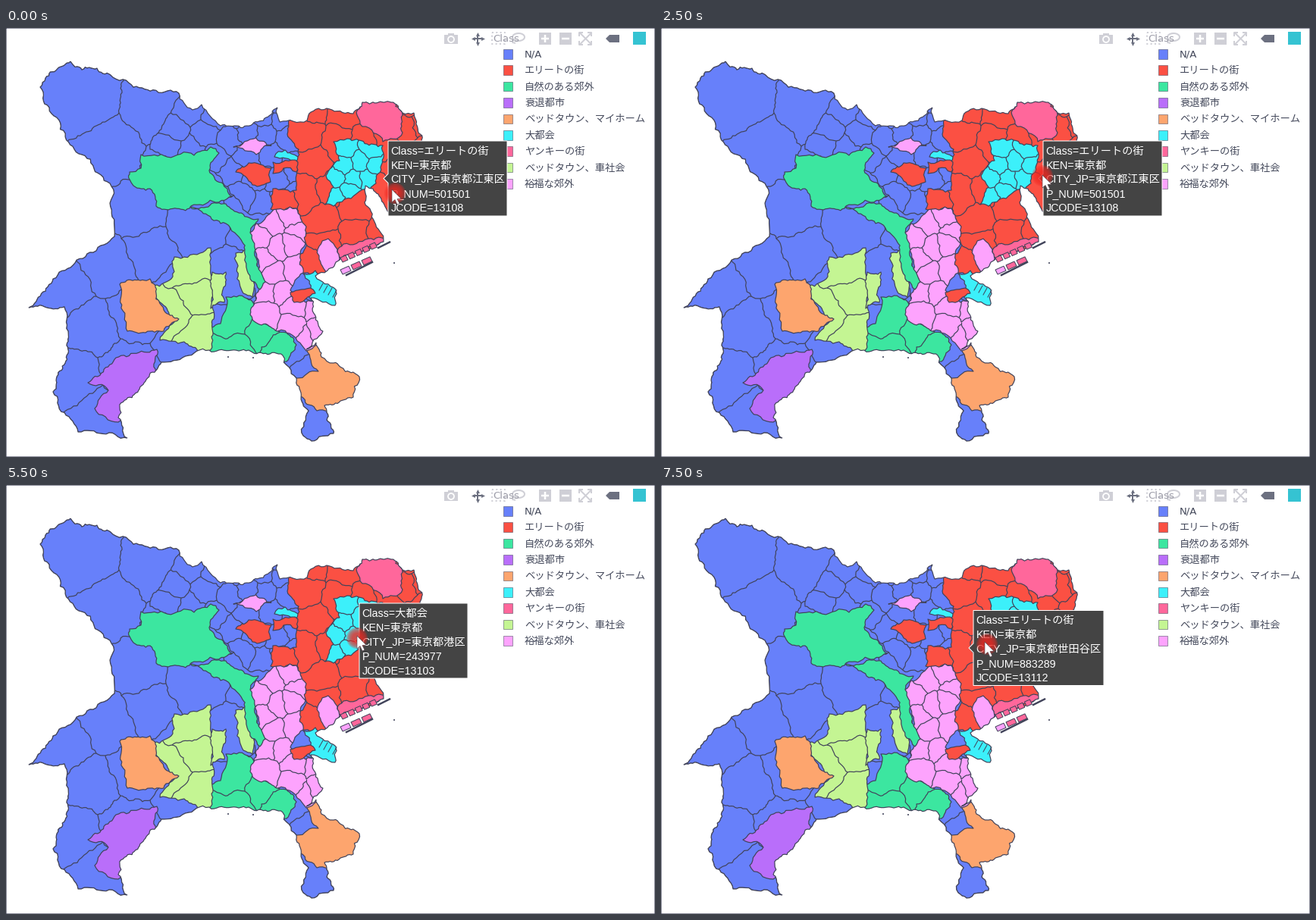
These frames come from a looping animation (856 by 566 pixels, 8 s). A matplotlib script:

```python
import math
import random

import matplotlib.pyplot as plt
import numpy as np
from matplotlib.animation import FuncAnimation
from matplotlib.collections import LineCollection
from matplotlib.patches import Circle, PathPatch, Polygon, Rectangle
from matplotlib.path import Path

W, H, DPI = 856, 566, 100
PX = 72 / DPI
plt.rcParams["toolbar"] = "None"

BLUE, RED, GREEN, PURPLE = "#6780fa", "#fb5043", "#3ce6a0", "#b96efa"
ORANGE, CYAN, PINK = "#fda56e", "#3cf0fa", "#ff679b"
LIME, LILAC = "#c4f593", "#fda3fd"
EDGE = "#41435a"
HOVER_FONT = ["Liberation Sans", "Noto Sans CJK JP"]
LEGEND_FONT = ["DejaVu Sans", "Noto Sans CJK JP"]

fig = plt.figure(figsize=(W / DPI, H / DPI), dpi=DPI, facecolor="white")
ax = fig.add_axes([0, 0, 1, 1])
ax.set_xlim(0, W)
ax.set_ylim(H, 0)
ax.axis("off")


def split(a, b, rng):
    """Midpoint displacement between a and b, without b itself."""
    d = math.dist(a, b)
    if d < 5:
        return [a]
    k = rng.uniform(-0.2, 0.2) * min(1, 16 / d)
    m = ((a[0] + b[0]) / 2 - (b[1] - a[1]) * k,
         (a[1] + b[1]) / 2 + (b[0] - a[0]) * k)
    return split(a, m, rng) + split(m, b, rng)


def rough(pts):
    """Natural-looking line; an edge shared by two shapes gets one course."""
    out = []
    for a, b in zip(pts, pts[1:]):
        lo, hi = sorted((a, b))
        rng = random.Random(lo[0] * 7919 + lo[1] * 104729 + hi[0] * 31 + hi[1])
        part = split(lo, hi, rng) + [hi]
        out += (part if lo == a else part[::-1])[:-1]
    return out + [pts[-1]]


def ring(flat):
    pts = list(zip(flat[::2], flat[1::2]))
    return rough(pts + pts[:1])


def spread(path, n, rng):
    """n evenly spread centres inside a path (k-means on random points)."""
    box = path.get_extents()
    pts = rng.uniform(box.min, box.max, (160 * n, 2))
    pts = pts[path.contains_points(pts)]
    centres = pts[:n]
    for _ in range(6):
        near = np.linalg.norm(pts[:, None] - centres, axis=2).argmin(1)
        centres = np.array([pts[near == i].mean(0) for i in range(n)])
    return centres


def cell(i, centres):
    """Voronoi cell i: a big square cut by every bisector."""
    poly = [np.array(p, float) for p in
            ((-W, -H), (2 * W, -H), (2 * W, 2 * H), (-W, 2 * H))]
    for j, other in enumerate(centres):
        if j == i:
            continue
        normal, mid = other - centres[i], (other + centres[i]) / 2
        kept = []
        for a, b in zip(poly, poly[1:] + poly[:1]):
            da, db = (a - mid) @ normal, (b - mid) @ normal
            if da <= 0:
                kept.append(a)
            if da * db < 0:
                kept.append(a + (b - a) * da / (da - db))
        poly = kept
    return [(round(x), round(y)) for x, y in poly]


def area(color, towns, *flat):
    """A coloured district, divided into a number of towns."""
    pts = ring(flat)
    patch = ax.add_patch(Polygon(pts, fc=color, ec=EDGE, lw=1.2 * PX,
                                 joinstyle="round", zorder=1))
    if towns == 1:
        return
    centres = spread(Path(pts), towns, np.random.default_rng(flat[0]))
    edges = set()
    for i in range(towns):
        c = cell(i, centres)
        edges |= {tuple(sorted(e)) for e in zip(c, c[1:] + c[:1])}
    lines = LineCollection([rough(e) for e in sorted(edges) if e[0] != e[1]],
                           colors=EDGE, linewidths=1.2 * PX, zorder=1)
    ax.add_collection(lines, autolim=False)
    lines.set_clip_path(patch)


COAST = (85, 44, 100, 55, 120, 53, 138, 62, 168, 78, 228, 86,
         246, 108, 258, 101, 283, 129, 325, 127, 358, 105, 361, 124,
         397, 122, 402, 111, 430, 108, 458, 113, 470, 98, 508, 98,
         523, 112, 538, 112, 548, 150, 508, 215, 506, 246, 484, 212,
         474, 208, 473, 230, 498, 282, 440, 306, 424, 320, 408, 327,
         435, 345, 434, 366, 402, 356, 418, 400, 396, 424, 409, 415,
         416, 434, 432, 442, 466, 460, 458, 487, 420, 498, 432, 535,
         403, 545, 392, 538, 399, 505, 383, 462, 365, 432, 320, 425,
         268, 425, 205, 441, 150, 500, 148, 514, 160, 541, 95, 533,
         62, 480, 78, 442, 82, 400, 77, 368, 30, 369, 62, 331,
         115, 296, 143, 275, 137, 205, 90, 160, 57, 105, 45, 78, 52, 66)


def draw_sea():
    """Hide whatever runs over the coast."""
    shore = ring(COAST)
    frame = [(0, 0), (0, H), (W, H), (W, 0), (0, 0)]
    codes = []
    for part in (frame, shore):
        codes += [Path.MOVETO] + [Path.LINETO] * (len(part) - 1)
    ax.add_patch(PathPatch(Path(frame + shore, codes), fc="white", ec=EDGE,
                           lw=1.2 * PX, zorder=1))


def draw_harbour():
    """Reclaimed land in two slanted rows, and piers."""
    for row, n, step, size in ((0, 5, 9.6, 7), (1, 3, 14, 11)):
        for i in range(n):
            x, y = 441 + step * i, 303 + 16 * row - 0.44 * step * i
            ax.add_patch(Polygon(
                [(x, y), (x + size, y - 0.44 * size),
                 (x + size + 3, y + 6 - 0.44 * size), (x + 3, y + 6)],
                fc=LILAC if row and not i else PINK, ec=EDGE, lw=PX, zorder=1))
    for x, y, length in ((449, 326, 34), (491, 290, 15)):
        ax.plot([x, x + length], [y, y - 0.5 * length], color=EDGE,
                lw=2.4 * PX, zorder=1)
    for i in range(4):
        x, y = 413 + 6 * i, 337 + 3 * i
        ax.plot([x + 5, x], [y, y + 9], color=EDGE, lw=PX, zorder=1)
    for x, y in ((512, 310), (293, 434), (326, 435)):
        ax.add_patch(Circle((x, y), 1, fc=EDGE, zorder=1))


def draw_map():
    area(BLUE, 30, *COAST)
    area(BLUE, 27, 190, 160, 230, 90, 380, 90, 395, 250, 320, 245, 275, 190)
    area(GREEN, 1, 163, 190, 178, 185, 178, 167, 248, 168, 270, 157, 281, 165,
         268, 188, 298, 222, 242, 238, 198, 235, 190, 212, 168, 208)
    area(GREEN, 4, 268, 440, 270, 395, 283, 390, 290, 355, 318, 357, 340, 390,
         370, 402, 383, 418, 370, 440)
    area(LIME, 4, 195, 340, 220, 328, 222, 302, 256, 297, 270, 290, 270, 440,
         235, 414, 203, 412, 222, 388, 195, 350)
    area(LIME, 1, 272, 322, 290, 322, 288, 362, 270, 370)
    area(LIME, 1, 303, 297, 318, 292, 325, 355, 313, 350)
    area(ORANGE, 1, 150, 338, 190, 331, 198, 350, 210, 375, 228, 384,
         208, 400, 160, 400)
    area(PURPLE, 1, 108, 468, 145, 435, 199, 424, 197, 450, 148, 520,
         117, 502, 135, 478)
    area(ORANGE, 1, 398, 428, 405, 405, 480, 440, 470, 495, 410, 505,
         392, 488, 383, 462, 412, 453)
    area(RED, 27, 372, 100, 420, 90, 560, 90, 560, 300, 437, 292, 420, 335,
         375, 313, 395, 290, 383, 238, 349, 239, 352, 212, 383, 214, 386, 160,
         371, 140)
    area(LILAC, 17, 330, 258, 350, 243, 383, 238, 396, 262, 388, 300, 392, 323,
         375, 346, 395, 362, 425, 360, 425, 410, 396, 426, 370, 402, 332, 390,
         322, 378, 340, 335, 322, 270)
    area(GREEN, 1, 243, 236, 290, 232, 333, 252, 322, 270, 328, 300, 342, 335,
         335, 345, 318, 320, 312, 283, 290, 258)
    area(CYAN, 10, 432, 150, 450, 146, 497, 155, 488, 205, 455, 225, 432, 235,
         421, 233, 432, 210, 422, 195, 440, 175)
    area(PINK, 1, 463, 115, 470, 90, 508, 90, 523, 115, 523, 138, 497, 150,
         470, 130)
    area(PINK, 1, 437, 296, 445, 285, 478, 278, 505, 275, 445, 315)
    area(LILAC, 1, 413, 288, 425, 278, 437, 292, 440, 305, 425, 330, 413, 305)
    area(CYAN, 1, 392, 324, 408, 320, 445, 340, 440, 375, 400, 356, 404, 346)
    area(RED, 1, 375, 349, 405, 345, 408, 350, 380, 362)
    area(CYAN, 1, 354, 170, 368, 161, 385, 170, 383, 176)
    area(RED, 1, 303, 190, 320, 178, 350, 185, 349, 203, 325, 207)
    area(RED, 1, 352, 177, 385, 177, 383, 190, 366, 185, 352, 192)
    area(LILAC, 1, 300, 157, 330, 145, 350, 155, 330, 167)
    draw_sea()
    draw_harbour()


def draw_legend():
    items = ((BLUE, "N/A"), (RED, "エリートの街"), (GREEN, "自然のある郊外"),
             (PURPLE, "衰退都市"), (ORANGE, "ベッドタウン、マイホーム"),
             (CYAN, "大都会"), (PINK, "ヤンキーの街"),
             (LIME, "ベッドタウン、車社会"), (LILAC, "裕福な郊外"))
    for i, (color, label) in enumerate(items):
        y = 34 + 21.4 * i
        ax.add_patch(Rectangle((656, y - 6), 12.5, 12.5, fc=color, ec=EDGE,
                               lw=0.5 * PX))
        ax.text(684, y + 4.8, label, family=LEGEND_FONT, color="#454a5c",
                size=13.3 * PX)
    ax.text(642, 18, "Class", family=LEGEND_FONT, color="#9c9ca8",
            size=13.3 * PX)


def draw_toolbar():
    pale, dark = "#cfcfd6", "#6c7080"

    def box(x, y, w, h, color):
        ax.add_patch(Rectangle((x, y), w, h, fc=color, ec="none"))

    def stroke(xs, ys, color, lw=2, **kw):
        ax.plot(xs, ys, color=color, lw=lw * PX, solid_capstyle="butt", **kw)

    # camera
    box(578, 9, 18, 12, pale)
    box(583, 6.5, 8, 4, pale)
    ax.add_patch(Circle((587, 15), 4, fc=pale, ec="white", lw=1.8 * PX))
    # pan
    stroke([616, 629], [14, 14], dark)
    stroke([622.5, 622.5], [8, 20], dark)
    for marker, dx, dy in (("<", -1, 0), (">", 1, 0), ("^", 0, -1), ("v", 0, 1)):
        ax.plot(622.5 + 6.5 * dx, 14 + 6.5 * dy, marker, color=dark,
                ms=5 * PX, mew=0)
    # box and lasso select
    stroke([641, 658, 658, 641, 641], [6, 6, 21, 21, 6], pale, ls=":")
    turn = np.linspace(0, math.tau, 41)
    stroke(676 + 8 * np.cos(turn), 12 + 5 * np.sin(turn), pale)
    stroke([669, 668, 672], [14, 19, 20], pale)
    # zoom in, zoom out, autoscale
    for x in (703, 730):
        box(x, 6, 16, 16, pale)
        stroke([x + 3, x + 13], [14, 14], "white", 2.5)
    stroke([711, 711], [9, 19], "white", 2.5)
    for sx in (-1, 1):
        for sy in (-1, 1):
            x, y = 764.5 + 8 * sx, 14 + 8 * sy
            stroke([764.5, x], [14, y], pale)
            stroke([x - 5 * sx, x, x], [y, y, y - 5 * sy], pale)
    # hover tag and badge
    ax.add_patch(Polygon([(791, 14), (796, 9), (809, 9), (809, 19), (796, 19)],
                         fc=dark))
    box(827, 5, 17, 17, "#35c3d2")


draw_map()
draw_legend()
draw_toolbar()

KOTO = (504, 149, 157, "エリートの街", "江東区", 501501, 13108)
MINATO = (466, 156, 143, "大都会", "港区", 243977, 13103)
SETAGAYA = (412, 165.5, 172, "エリートの街", "世田谷区", 883289, 13112)
# start time, hover label, pointer tip, glow centre
STEPS = ((0, KOTO, (509, 213), (513, 218)),
         (500, KOTO, (503, 194), (503, 195)),
         (4000, MINATO, (463, 199), (463, 202)),
         (7000, SETAGAYA, (427, 207), (430, 210)))
ARROW = ((0, 0), (0, 17), (4, 13.5), (7, 20), (10, 18.5), (7, 12.5), (12, 12))
STEP_MS, LOOP_MS = 500, 8000

hover = ax.add_patch(Polygon([(0, 0), (1, 1), (1, 0)], fc="#444444",
                             ec="white", lw=PX, zorder=10))
rows = [ax.text(0, 0, "", family=HOVER_FONT, size=14.3 * PX, color="white",
                zorder=11) for _ in range(5)]
glow = [ax.add_patch(Circle((0, 0), r, fc="#f02822", ec="none", alpha=0.27,
                            zorder=12)) for r in (14, 12.5, 11, 9, 7)]
pointer = ax.add_patch(Polygon(ARROW, fc="white", ec="#55404a",
                               lw=0.6 * PX, zorder=13))


def update(i):
    t = i * STEP_MS
    _, label, tip, centre = [s for s in STEPS if s[0] <= t][-1]
    x, y, w, kind, ward, people, code = label
    h, mid = 99, y + 49.5
    hover.set_xy([(x, y), (x + w, y), (x + w, y + h), (x, y + h),
                  (x, mid + 6), (x - 6, mid), (x, mid - 6)])
    lines = (f"Class={kind}", "KEN=東京都", f"CITY_JP=東京都{ward}",
             f"P_NUM={people}", f"JCODE={code}")
    for k, (row, s) in enumerate(zip(rows, lines)):
        row.set_text(s)
        row.set_position((x + 3.5, y + 17.5 + 19 * k))
    for c in glow:
        c.center = centre
    pointer.set_xy([(tip[0] + dx, tip[1] + dy) for dx, dy in ARROW])
    return [hover, *rows, *glow, pointer]


anim = FuncAnimation(fig, update, frames=LOOP_MS // STEP_MS,
                     interval=STEP_MS, repeat=True, repeat_delay=0)
plt.show()
```
